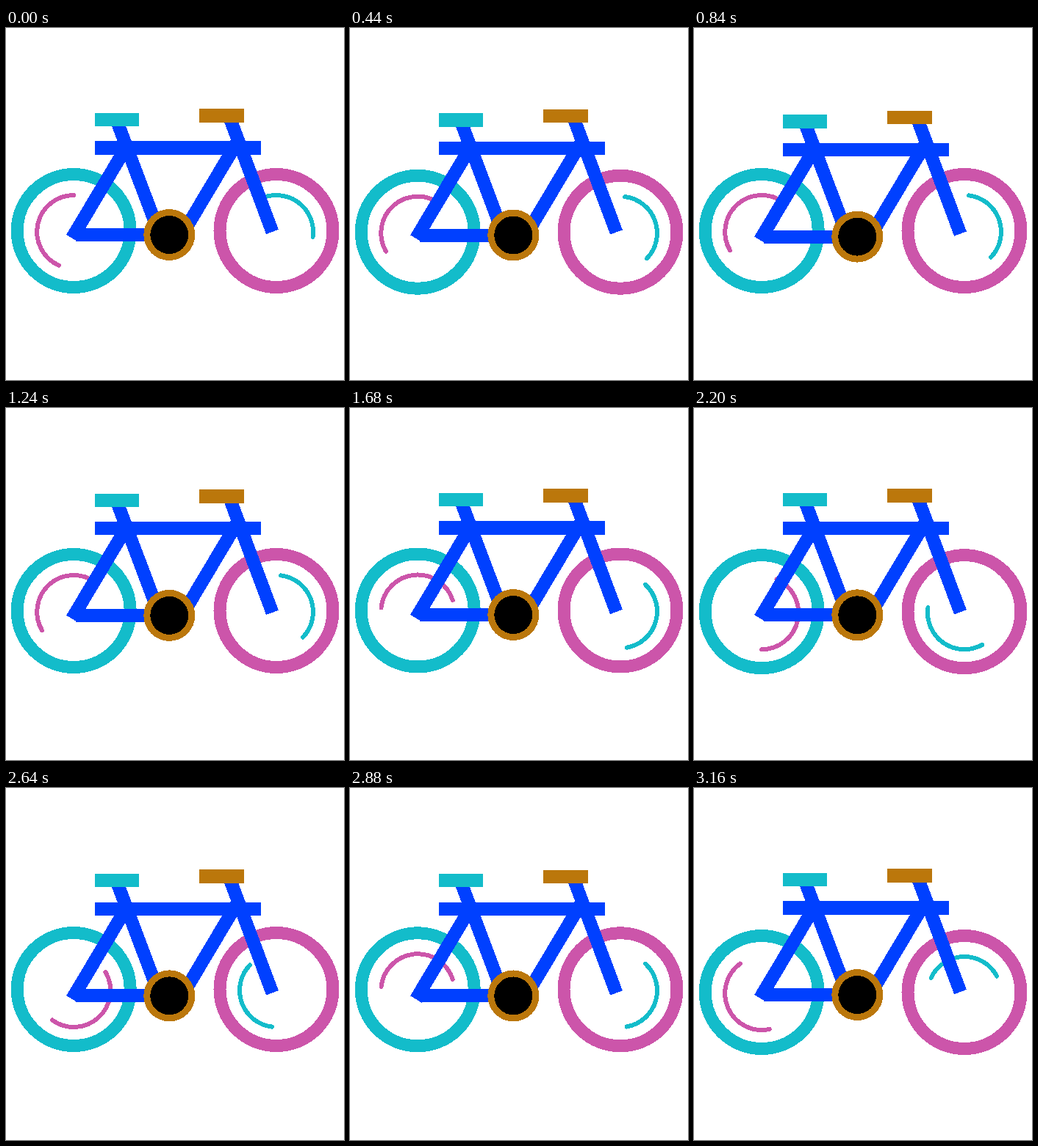
Write an HTML page that moves like this. It is 460 px wide and 480 px high and loops after 3200 ms.

```html
<!DOCTYPE html>
<html lang="en">
<head>
<meta charset="utf-8">
<title>Riding bicycle</title>
<style>
  html, body { margin: 0; width: 100%; height: 100%; overflow: hidden; background: #fff; }
  svg { display: block; width: 460px; height: 480px; shape-rendering: crispEdges; }
  .tyre { fill: none; stroke-width: 17; }
  .glint { fill: none; stroke-width: 6; stroke-linecap: round; }
  .tubes { fill: none; stroke: #0040ff; stroke-width: 18; }
</style>
</head>
<body>
<svg viewBox="0 0 460 480">
  <g id="wheels"></g>
  <g id="body">
    <g class="tubes">
      <path d="M150.6 126L207 276"/>
      <path d="M89.8 286.5L161 167"/>
      <path d="M95 282H215"/>
      <path d="M242.5 277L314.5 156"/>
      <path d="M304.3 122L362.5 278"/>
      <path d="M121 163.4H347" stroke-width="18.2"/>
    </g>
    <rect x="121" y="115.8" width="60" height="18.2" fill="#13bcca"/>
    <rect x="263" y="110.1" width="61" height="18.7" fill="#bb770b"/>
    <circle cx="222.3" cy="282" r="35" fill="#bb770b"/>
    <circle cx="222.3" cy="282" r="26" fill="#000"/>
  </g>
</svg>
<script>
const STEP = 40, STEPS = 80;
const TEAL = '#13bcca', PINK = '#cc55aa';
const HUB_Y = 276.5, GLINT_DROP = 1.5, GLINT_R = 50;

// Bounce cycles: [phase 0..80, vertical offset]
const wheelBounce = [[0, 0], [7, 0], [14, -.5], [22, -2], [37, 0], [45, 1.2], [53, 2], [80, 0]];
const bodyBounce = [[0, 0], [3, .9], [33, 2.6], [58, 1.35], [66, 0], [75, .3], [80, 0]];

const wheels = document.getElementById('wheels');
const body = document.getElementById('body');

function add(tag, attrs) {
  const el = document.createElementNS('http://www.w3.org/2000/svg', tag);
  for (const key in attrs) el.setAttribute(key, attrs[key]);
  return wheels.appendChild(el);
}

function makeWheel(x, tyre, glint, from, to) {
  const cy = HUB_Y + GLINT_DROP;
  const point = deg => {
    const a = deg * Math.PI / 180;
    return `${x + GLINT_R * Math.cos(a)} ${cy + GLINT_R * Math.sin(a)}`;
  };
  add('circle', { class: 'tyre', cx: x, cy: HUB_Y, r: 77, stroke: tyre });
  const arc = add('path', {
    class: 'glint', stroke: glint,
    d: `M${point(from)}A${GLINT_R} ${GLINT_R} 0 0 1 ${point(to)}`
  });
  return deg => arc.setAttribute('transform', `rotate(${deg} ${x} ${cy})`);
}

const spinners = [
  makeWheel(92.2, TEAL, PINK, 114, 270),
  makeWheel(368, PINK, TEAL, -119, 8)
];

function sample(keys, phase) {
  const i = keys.findIndex(k => k[0] > phase);
  const [p0, v0] = keys[i - 1], [p1, v1] = keys[i];
  return v0 + (v1 - v0) * (phase - p0) / (p1 - p0);
}

function shift(el, keys, cycles, step) {
  el.setAttribute('transform', `translate(0 ${sample(keys, step * cycles % STEPS)})`);
}

function draw(time) {
  const step = Math.floor(time / STEP) % STEPS;
  spinners.forEach(spin => spin(step * 36));
  shift(wheels, wheelBounce, 27, step);
  shift(body, bodyBounce, 13, step);
}

const start = performance.now();
function tick() {
  draw(performance.now() - start);
  requestAnimationFrame(tick);
}
tick();
</script>
</body>
</html>
```
